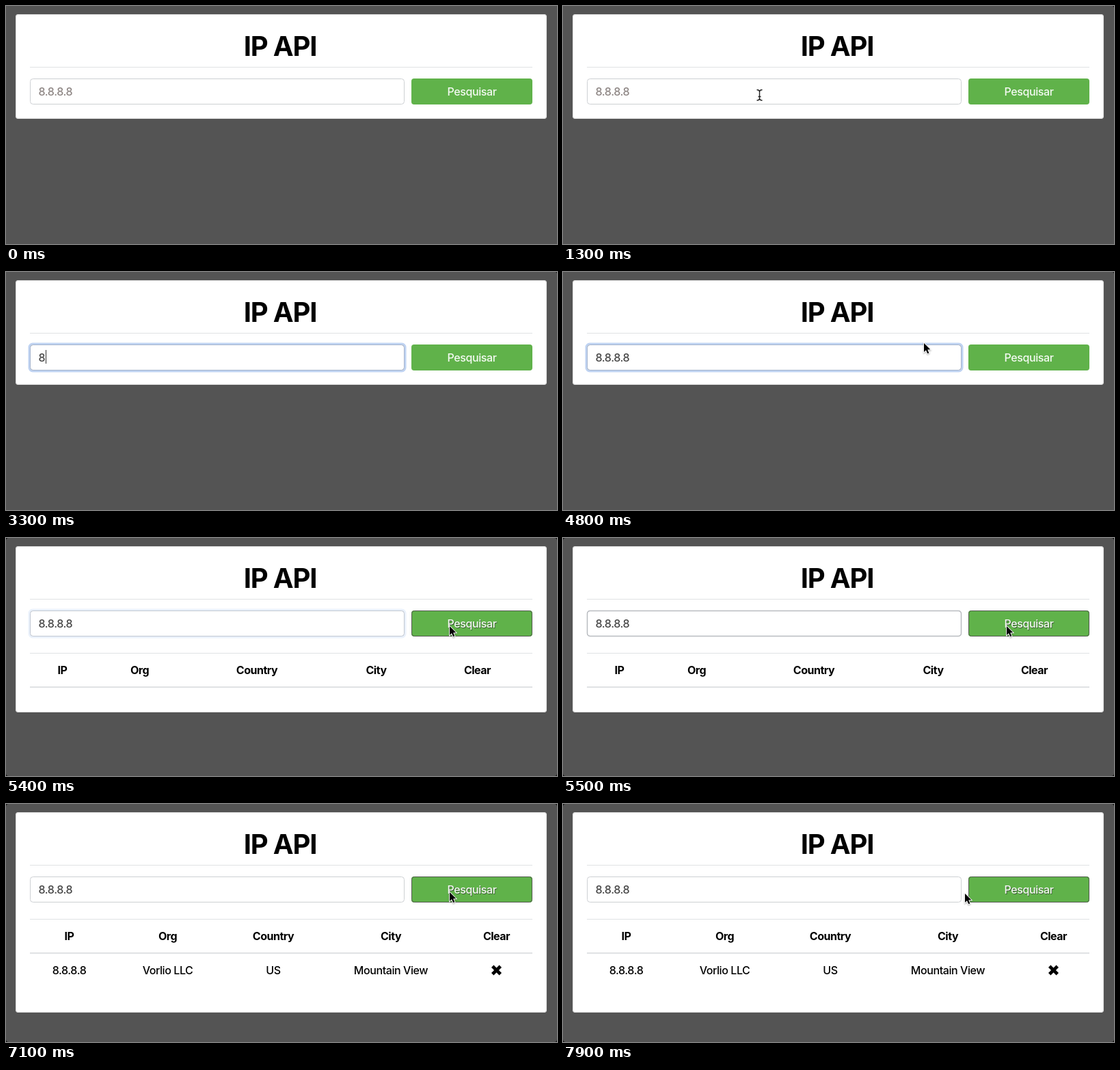
An HTML page with a canvas for the animation above (8000 ms loop, 806x348 px).

```html
<!DOCTYPE html>
<html lang="pt">
<head>
<meta charset="utf-8">
<title>IP API</title>
<style>
html, body { margin: 0; width: 806px; height: 348px; overflow: hidden; background: #545454; }
canvas { display: block; }
</style>
</head>
<body>
<canvas id="stage" width="806" height="348"></canvas>
<script>
const ctx = document.getElementById('stage').getContext('2d');
const LOOP = 8000, FOCUS = 2450, CLICK = 5300, RESULT = 7000;
const KEYS = [3200, 3500, 3640, 3780, 3930, 4070, 4220];
const ADDRESS = '8.8.8.8';
const HEADS = ['IP', 'Org', 'Country', 'City', 'Clear'];
const EMPTY_COLS = [82.5, 195.5, 367, 541.5, 689.5];
const FULL_COLS = [92.5, 236.5, 391, 563, 717.5];
const ROW = [ADDRESS, 'Vorlio LLC', 'US', 'Mountain View'];
// pointer path: time, x, y
const PATH = [
  [400, 420, 348], [1100, 287, 130], [4400, 287, 130], [4800, 528, 104],
  [5150, 649, 129], [7350, 649, 129], [7900, 588, 131]
];

const clamp = v => Math.max(0, Math.min(1, v));
const ease = v => v * v * (3 - 2 * v);

function text(str, x, y, color, { size = 16, weight = 450, align = 'center', gap = -0.42 } = {}) {
  ctx.font = `${weight} ${size}px Inter, "Liberation Sans", sans-serif`;
  ctx.letterSpacing = gap + 'px';
  ctx.textAlign = align;
  ctx.fillStyle = color;
  ctx.fillText(str, x, y);
  return ctx.measureText(str).width;
}

function box(x, y, w, h, r, fill, stroke, line = 1) {
  ctx.beginPath();
  ctx.roundRect(x, y, w, h, r);
  if (fill) { ctx.fillStyle = fill; ctx.fill(); }
  if (stroke) { ctx.strokeStyle = stroke; ctx.lineWidth = line; ctx.stroke(); }
}

function rule(y, h = 1) {
  ctx.fillStyle = '#e0e2e4';
  ctx.fillRect(35, y, 735, h);
}

function drawInput(t) {
  const focus = clamp((t - FOCUS) / 150) * clamp(1 - (t - CLICK) / 150);
  if (focus > 0) box(34, 105, 550, 40, 5, null, `rgba(191,211,242,${focus})`, 3);
  box(35.5, 106.5, 547, 37, 4, '#fff', '#cdd0d3');
  if (focus > 0) box(35.5, 106.5, 547, 37, 4, null, `rgba(165,180,205,${focus})`);
  else if (t > CLICK && t < 6100) box(35.5, 106.5, 547, 37, 4, null, '#b9bcc0', 1.5);

  const typed = ADDRESS.slice(0, KEYS.filter(k => t >= k).length);
  const left = { align: 'left' };
  const width = typed ? text(typed, 47.5, 131, '#444', left) : 0;
  if (!typed) text(ADDRESS, 47.5, 131, '#8d8583', left);

  const last = KEYS.filter(k => t >= k).pop() || FOCUS;
  if (t >= FOCUS && t < CLICK && (t - last) % 1000 < 500) {
    ctx.fillStyle = '#333';
    ctx.fillRect(Math.round(48 + width), 114, 1, 20);
  }
}

function drawButton(t) {
  box(593, 106, 177, 38, 4, '#60b24a');
  if (t >= CLICK) {
    box(593.5, 106.5, 176, 37, 4, null, '#52594f');
    text('Pesquisar', 682.3, 131.7, 'rgba(50,60,50,.75)');
  }
  text('Pesquisar', 681.5, 131, '#f4faf2');
}

function drawTable(t) {
  const full = t >= RESULT;
  const cols = full ? FULL_COLS : EMPTY_COLS;
  rule(168);
  rule(217, 2);
  HEADS.forEach((h, i) => text(h, cols[i], 199, '#000', { weight: 700, gap: -0.5 }));
  if (!full) return;
  ROW.forEach((cell, i) => text(cell, cols[i], 249, '#000'));
  ctx.strokeStyle = '#000';
  ctx.lineWidth = 4.8;
  ctx.beginPath();
  ctx.moveTo(711.7, 237.2); ctx.lineTo(723.3, 248.8);
  ctx.moveTo(723.3, 237.2); ctx.lineTo(711.7, 248.8);
  ctx.stroke();
}

function pointerAt(t) {
  const i = PATH.findIndex(p => t < p[0]);
  if (i < 0) return PATH[PATH.length - 1].slice(1);
  const [t0, x0, y0] = PATH[i - 1], [t1, x1, y1] = PATH[i];
  const k = ease((t - t0) / (t1 - t0));
  return [x0 + (x1 - x0) * k, y0 + (y1 - y0) * k];
}

function drawArrow() {
  ctx.scale(0.9, 0.9);
  ctx.beginPath();
  ctx.moveTo(0, 0);
  for (const [x, y] of [[0, 14.5], [3.3, 11.4], [5.8, 17], [8.2, 16], [5.8, 10.6], [10.3, 10.4]]) ctx.lineTo(x, y);
  ctx.closePath();
  ctx.shadowColor = 'rgba(0,0,0,.35)';
  ctx.shadowBlur = 2;
  ctx.shadowOffsetY = 1;
  ctx.strokeStyle = '#fff';
  ctx.lineWidth = 2;
  ctx.stroke();
  ctx.shadowColor = 'transparent';
  ctx.fillStyle = '#000';
  ctx.fill();
}

function drawBeam() {
  ctx.beginPath();
  ctx.moveTo(-3.5, -7.5);
  ctx.quadraticCurveTo(0, -7.5, 0.5, -5);
  ctx.quadraticCurveTo(1, -7.5, 4.5, -7.5);
  ctx.moveTo(0.5, -5); ctx.lineTo(0.5, 5.5);
  ctx.moveTo(-3.5, 8);
  ctx.quadraticCurveTo(0, 8, 0.5, 5.5);
  ctx.quadraticCurveTo(1, 8, 4.5, 8);
  ctx.moveTo(-1.5, 2.5); ctx.lineTo(2.5, 2.5);
  ctx.strokeStyle = '#222';
  ctx.lineWidth = 1.4;
  ctx.stroke();
}

function drawPointer(t) {
  if (t < PATH[0][0] || (t >= KEYS[0] && t < 4400)) return;
  const [x, y] = pointerAt(t);
  const inField = x > 35 && x < 583 && y > 106 && y < 144;
  ctx.save();
  ctx.translate(x, y);
  inField ? drawBeam() : drawArrow();
  ctx.restore();
}

function draw(t) {
  ctx.fillStyle = '#111';
  ctx.fillRect(0, 0, 806, 348);
  box(0, 0, 806, 348, t >= CLICK ? 4 : [0, t >= 100 ? 3 : 0, 0, 0], '#545454');
  const height = t >= RESULT ? 293 : t >= CLICK ? 243 : 153;
  box(14, 12, 777, height, 4, '#fff');
  box(14.5, 12.5, 776, height - 1, 4, null, 'rgba(0,0,0,.13)');
  text('IP API', 401, 72.5, '#000', { size: 40, weight: 700, gap: -1.2 });
  rule(89);
  drawInput(t);
  drawButton(t);
  if (t >= CLICK) drawTable(t);
  drawPointer(t);
}

const start = performance.now();
function tick() {
  draw((performance.now() - start) % LOOP);
  requestAnimationFrame(tick);
}
tick();
</script>
</body>
</html>
```
